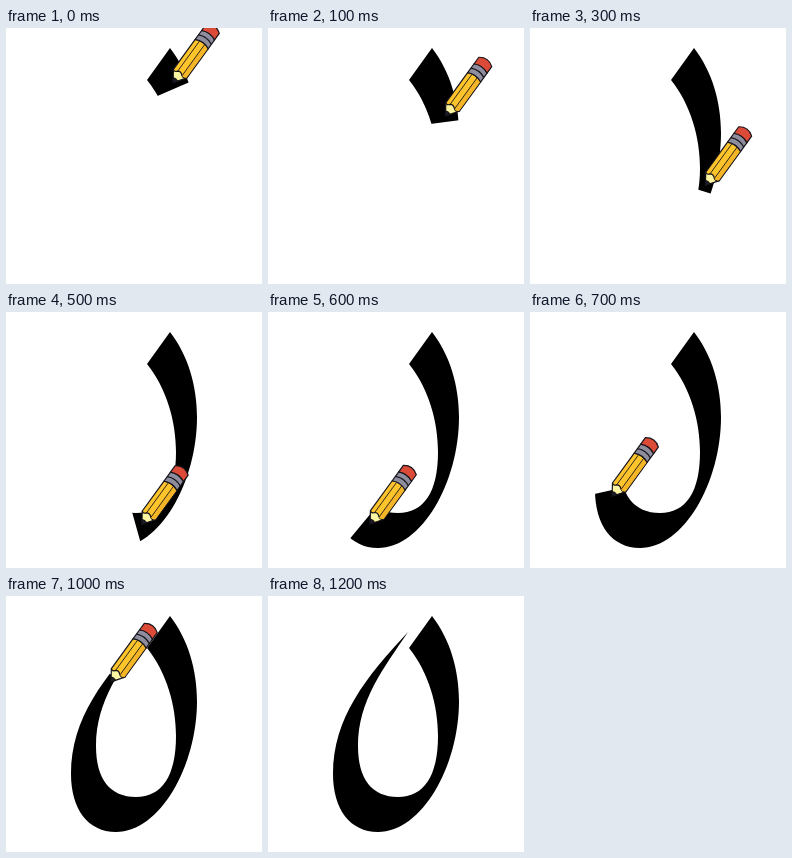
Recreate the animation shown at these times as an HTML page. Size 256 by 256 pixels, loop 3.2 s.

```html
<!DOCTYPE html>
<html lang="en">
<head>
<meta charset="utf-8">
<title>Pencil drawing a loop</title>
<style>
html, body { margin: 0; width: 100%; height: 100%; overflow: hidden; background: #fff; }
svg { display: block; width: 100%; height: 100%; }
</style>
</head>
<body>
<svg viewBox="0 0 256 256">
  <!-- The pencil follows the guide; its wide dash uncovers the ink -->
  <mask id="reveal" maskUnits="userSpaceOnUse" x="0" y="0" width="256" height="256">
    <path id="guide" fill="none" stroke="#fff" stroke-width="56" d="M150 34C172 50 180 85 180 120
      C180 172 155 216 118 216C96 216 78 196 78 153C78 120 105 85 142 33"/>
  </mask>
  <g mask="url(#reveal)">
    <path d="M164 20C182 43 191 74 191 105C191 170 154 236 110 236C82 236 65 213 65 178
      C65 122 98 81 140 36C116 72 90 104 90 150C90 183 104 201 130 201C156 201 170 180 170 140C170 110 161 77 141 52Z"/>
  </g>
  <!-- Tip at 0,0, pointing down before rotation -->
  <g id="pencil" stroke="#15131a" stroke-width="1.2" stroke-linejoin="round">
    <path d="M0 0L-7.5 -11L-3 -14L3 -13L8.5 -12Z" fill="#fdf5a2"/>
    <path d="M0 0L-2.7 -4L0 -4.6L2.8 -4Z" fill="#20202a"/>
    <path d="M-7.5 -11V-48Q.5 -52 8.5 -48V-12Q6 -9 3 -11Q0 -14 -3 -12Q-5 -9 -7.5 -11Z" fill="#fdc42c"/>
    <path d="M3.2 -11V-49.5L8 -48V-12Q5 -9 3.2 -11Z" fill="#f4b526" stroke="none"/>
    <path d="M-3 -12V-49.4M3.2 -11V-49.5" fill="none" stroke-width=".8"/>
    <path d="M-7.5 -48V-59Q.5 -63 8.5 -59V-48Q.5 -52 -7.5 -48Z" fill="#8d8d9d"/>
    <path d="M-7.5 -53.5Q.5 -57.5 8.5 -53.5" fill="none"/>
    <path d="M-7.5 -59V-67Q.5 -73 8.5 -67V-59Q.5 -63 -7.5 -59Z" fill="#dc4b38"/>
  </g>
</svg>
<script>
const LOOP = 3200, STEP = 100, MOVES = 12;
const START = 27, STRIDE = 35, LEAD = 6;

const guide = document.getElementById('guide');
const pencil = document.getElementById('pencil');

function draw(time) {
  const step = Math.min(MOVES, Math.floor(time % LOOP / STEP));
  const travelled = START + STRIDE * step;
  const { x, y } = guide.getPointAtLength(travelled);
  guide.setAttribute('stroke-dasharray', `${travelled + LEAD} 999`);
  pencil.setAttribute('transform', `translate(${x} ${y}) rotate(36)`);
  pencil.style.display = step < MOVES ? '' : 'none';
}

const begin = performance.now();
function tick() {
  draw(performance.now() - begin);
  requestAnimationFrame(tick);
}
tick();
</script>
</body>
</html>
```
